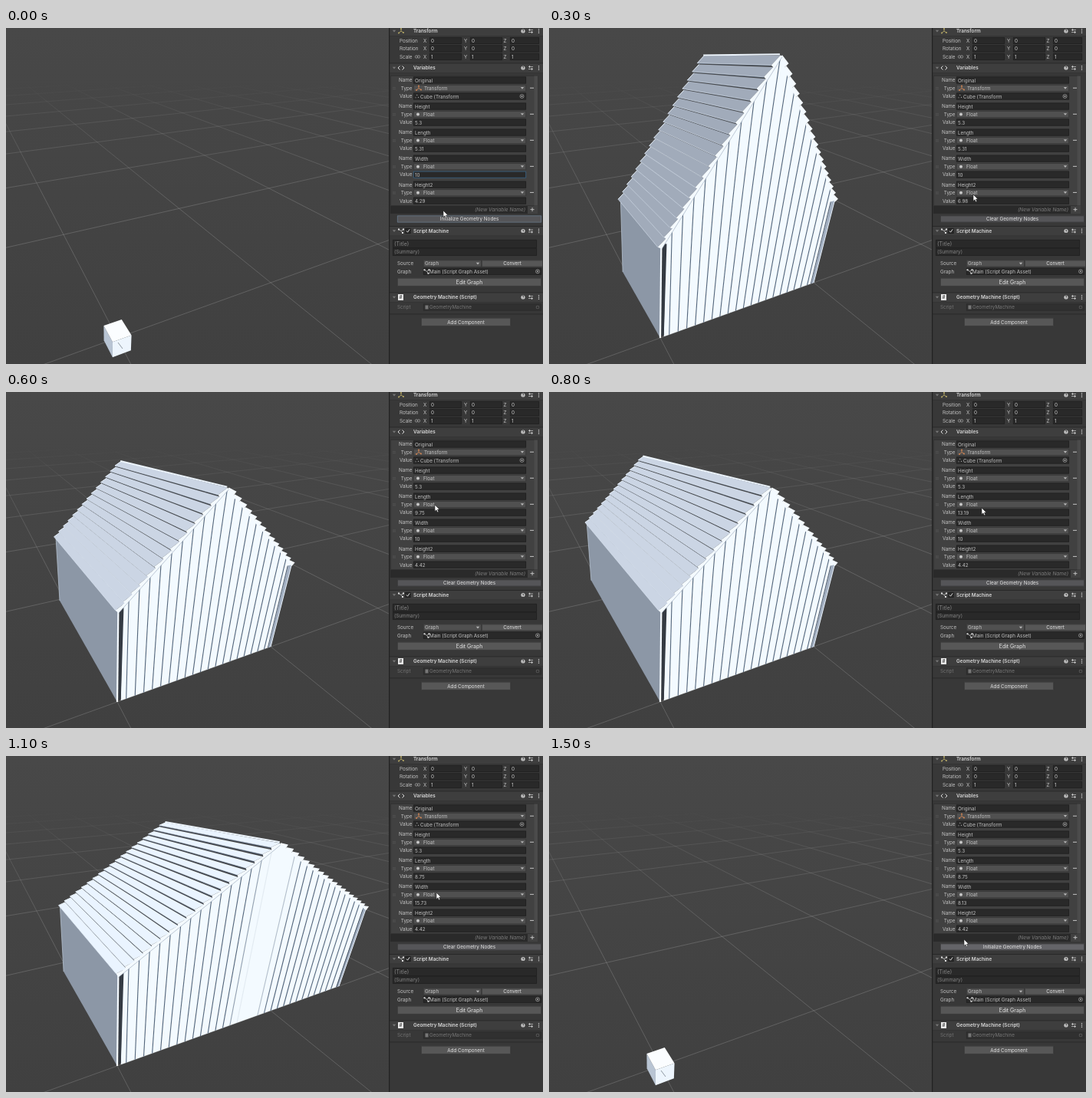
These frames come from a looping animation (700 px wide and 438 px high, 1600 ms). An HTML page with a canvas:

```html
<!DOCTYPE html>
<html lang="en">
<head>
<meta charset="utf-8">
<style>
html, body { margin: 0; width: 100%; height: 100%; overflow: hidden; background: #383838; }
canvas { display: block; width: 700px; height: 438px; }
</style>
</head>
<body>
<canvas id="stage" width="700" height="438"></canvas>
<script>
const ctx = document.getElementById('stage').getContext('2d');
const STEP = 100, SPLIT = 500, WALL = 5.3, PLANK = 0.5;

// One state per step: house shown, length, width, gable height, cursor x, cursor y
const STATES = [
  [0, 5.31, 10, 4.29, 570, 238],
  [1, 5.31, 10, 4.29, 566, 238],
  [1, 5.31, 10, 7.72, 556, 217],
  [1, 5.31, 10, 6.98, 553, 217],
  [1, 5.31, 10, 4.42, 549, 214],
  [1, 6.42, 10, 4.42, 554, 149],
  [1, 9.75, 10, 4.42, 559, 147],
  [1, 11.86, 10, 4.42, 562, 149],
  [1, 13.19, 10, 4.42, 564, 151],
  [1, 8.75, 10, 4.42, 558, 153],
  [1, 8.75, 12.4, 4.42, 556, 180],
  [1, 8.75, 15.73, 4.42, 561, 178],
  [1, 8.75, 8.13, 4.42, 550, 187],
  [1, 8.75, 8.13, 4.42, 548, 239],
  [0, 8.75, 8.13, 4.42, 544, 239],
  [0, 8.75, 8.13, 4.42, 541, 239]
];

// Perspective of the scene: w across the front, l into depth, h up
function project(w, l, h) {
  const d = 1 + 0.01828 * w + 0.058 * l - 0.026 * h;
  return [(145 + 26.31 * w - 3.63 * l - 3.55 * h) / d,
          (404 - 1.13 * w + 2.24 * l - 30.15 * h) / d];
}

function ground(w, l) {
  const d = 1 + 0.0217 * w + 0.05 * l;
  return [(145 + 27.5 * w - 3.25 * l) / d, 404 / d];
}

function trace(points) {
  ctx.beginPath();
  points.forEach(([x, y]) => ctx.lineTo(x, y));
}

function poly(points, fill) {
  trace(points);
  ctx.closePath();
  ctx.fillStyle = fill;
  ctx.fill();
}

function line(points, color, width = 1) {
  trace(points);
  ctx.strokeStyle = color;
  ctx.lineWidth = width;
  ctx.stroke();
}

const solid = (points, fill) => poly(points.map(p => project(...p)), fill);
const edge = (points, color, width) => line(points.map(p => project(...p)), color, width);

function drawGround() {
  const sky = ctx.createLinearGradient(0, 0, 0, 438);
  sky.addColorStop(0, '#484848');
  sky.addColorStop(1, '#404040');
  ctx.fillStyle = sky;
  ctx.fillRect(0, 0, SPLIT, 438);
  const fade = ctx.createLinearGradient(0, 72, 0, 230);
  fade.addColorStop(0, 'rgba(150,150,150,0)');
  fade.addColorStop(0.3, 'rgba(150,150,150,.24)');
  fade.addColorStop(1, 'rgba(150,150,150,.46)');
  for (let w = -10; w <= 300; w += 10) line([ground(w, -6), ground(w, 90)], fade, 0.8);
  for (let l = 0; l <= 90; l += 10) line([ground(-12, l), ground(300, l)], fade, 0.8);
}

function drawCube() {
  const a = -0.5, b = 0.5;
  solid([[a, a, a], [a, b, a], [a, b, b], [a, a, b]], '#b8c4d3');
  solid([[a, a, b], [a, b, b], [b, b, b], [b, a, b]], '#fbfdff');
  solid([[a, a, a], [b, a, a], [b, a, b], [a, a, b]], '#edf5fd');
  line([[146, 410], [152, 418]], '#77808b', 0.8);
}

function drawFront(W, rise) {
  const slope = rise / (W / 2);
  const top = w => WALL + slope * Math.min(w, W - w);
  solid([[0.2, 0, 0], [W, 0, 0], [W, 0, top(W)], [W / 2, 0, top(W / 2)], [0.2, 0, top(0.2)]], '#f3faff');
  for (let w = PLANK; w < W - 0.1; w += PLANK) {
    ctx.globalAlpha = W > 12 ? Math.min(1, Math.max(0, Math.abs(w - W * 0.515) - 0.5)) : 1;
    edge([[w, 0, 0], [w, 0, top(w)]], '#53657a', 1.1);
  }
  ctx.globalAlpha = 1;
  solid([[0.06, 0, 0.1], [0.2, 0, 0.1], [0.26, 0, 5.3], [0.06, 0, 5.3]], '#343a42');
  edge([[0, 0, 0], [0, 0, WALL]], '#f4faff', 2.2);
  solid([[W - 0.2, 0, 0], [W, 0, 0], [W + 0.02, 0, 5.2], [W - 0.24, 0, 5.2]], '#a3b0c2');
  edge([[W - 0.22, 0, 0], [W - 0.25, 0, 5.2]], '#46515f', 0.9);
  edge([[W, 0, 0], [W + 0.02, 0, 5.2]], '#e5eef8', 1);
}

function drawRoof(L, W, rise) {
  const half = W / 2, run = Math.hypot(half, rise);
  const nw = rise / run, nh = half / run, count = Math.ceil(run / PLANK);
  const g = Math.min(236, 160 + (nh - 0.58) * 252);
  const face = `rgb(${g},${g + 10},${Math.min(255, g + 25)})`;
  const near = -0.04, far = L - 0.35;
  const at = (s, lift, side) => {
    const w = -0.04 + s * (half + 0.04) - nw * lift;
    return [side ? W - w : w, WALL - 0.12 + s * (rise + 0.12) + nh * lift];
  };
  const set = ([w, h], l) => [w, l, h];
  for (const side of [1, 0]) {
    for (let i = 0; i < count; i++) {
      const s0 = i / count, s1 = (i + 1) / count;
      const low = at(s0, 0.18, side), high = at(s1, 0.05, side);
      const under = at(s0, 0.11, side), back = at(s1, -0.06, side);
      const foot = at(s0, -0.06, side);
      if (!side) {
        solid([set(under, near), set(under, far), set(low, far), set(low, near)], '#465263');
        solid([set(low, near), set(low, far), set(high, far), set(high, near)], face);
        edge([set(low, near), set(low, far)], '#e2ecf8', 0.6);
        edge([set(low, far), set(high, far)], '#e8f1fa', 1);
      }
      solid([low, high, back, foot].map(p => set(p, near)), '#f4faff');
      if (!side) edge([set(foot, near), set(back, near)], '#8795a8', 0.5);
    }
  }
  const ridge = at(1, 0.1, 0);
  edge([set(ridge, near), set(ridge, far)], '#edf5fd', 2);
}

function drawHouse(L, W, rise) {
  const back = L - 0.25;
  solid([[0, 0, 0], [0, L, 0], [0, back, 5.25], [0, 0, 5.25]], '#8c97a6');
  edge([[0, L, 0], [0, back, 5.25]], '#b4c0cf', 0.8);
  drawFront(W, rise);
  drawRoof(L, W, rise);
}

function box(x, y, w, h, fill, border) {
  ctx.fillStyle = fill;
  ctx.fillRect(x, y, w, h);
  if (!border) return;
  ctx.strokeStyle = border;
  ctx.lineWidth = 0.7;
  ctx.strokeRect(x + 0.35, y + 0.35, w - 0.7, h - 0.7);
}

function text(str, x, y, { color = '#c4c4c4', size = 6.3, weight = 400, align = 'left', style = '' } = {}) {
  ctx.font = `${style} ${weight} ${size}px Inter, sans-serif`;
  ctx.fillStyle = color;
  ctx.textAlign = align;
  ctx.fillText(str, x, y + 2.3);
}

function dot(x, y, r, color) {
  ctx.beginPath();
  ctx.arc(x, y, r, 0, Math.PI * 2);
  ctx.fillStyle = color;
  ctx.fill();
}

function ring(x, y, r) {
  ctx.beginPath();
  ctx.arc(x, y, r, 0, Math.PI * 2);
  ctx.strokeStyle = '#aaa';
  ctx.lineWidth = 0.7;
  ctx.stroke();
}

function picker(x, y) {
  ring(x, y, 2.5);
  dot(x, y, 1, '#aaa');
}

const field = (x, y, w, border = '#202020') => box(x, y - 4.5, w, 9, '#292929', border);
const button = (label, x, y, w, h, fill = '#575757', size = 6.3, border = '#303030') => {
  box(x, y - h / 2, w, h, fill, border);
  text(label, x + w / 2, y, { align: 'center', color: '#e4e4e4', size });
};
const arrow = (x, y, color = '#b5b5b5') => poly([[x - 2.2, y - 1.2], [x + 2.2, y - 1.2], [x, y + 1.5]], color);

function axes(x, y, color, k = 1) {
  const tips = [[0, -3], [-3, 2.5], [3, 2]].map(([dx, dy]) => [x + dx * k, y + dy * k]);
  tips.forEach(tip => {
    if (k === 1) line([[x, y], tip], color, 0.8);
    dot(...tip, 0.9 * k, color);
  });
}

function nodes(x, y) {
  line([[x - 3, y - 2], [x, y], [x + 3, y - 2]], '#ccc', 0.7);
  line([[x, y], [x + 2, y + 2.5]], '#ccc', 0.7);
  [[-3, -2], [3, -2], [2, 2.5]].forEach(([dx, dy]) => box(x + dx - 1, y + dy - 1, 2, 2, '#ddd'));
}

function header(title, y) {
  box(SPLIT, y - 6.5, 200, 13, '#3e3e3e');
  box(SPLIT, y - 6.5, 200, 0.8, '#242424');
  box(SPLIT, y + 6, 200, 0.6, '#303030');
  arrow(506, y, '#777');
  text(title, 531, y, { weight: 600, color: '#dadada', size: 6.35 });
  dot(674, y, 2.6, '#c8c8c8');
  text('?', 674, y - 0.2, { size: 4.8, weight: 700, color: '#3e3e3e', align: 'center' });
  [-1.5, 1.5].forEach(d => {
    line([[681, y + d], [687, y + d]], '#bbb', 0.8);
    box(684 + d - 0.6, y + d - 1.3, 1.2, 2.6, '#ccc');
  });
  [-2.3, 0, 2.3].forEach(d => dot(694.5, y + d, 0.75, '#ccc'));
}

function drawTransform() {
  header('Transform', 4);
  axes(515, 4, '#c2b36a');
  [['Position', 16.5, '0'], ['Rotation', 27, '0'], ['Scale', 37.5, '1']].forEach(([label, y, value]) => {
    text(label, 513, y);
    [['X', 544, 552], ['Y', 597, 605], ['Z', 648.5, 657]].forEach(([axis, lx, fx]) => {
      text(axis, lx, y);
      field(fx, y, fx === 657 ? 38 : 42);
      text(value, fx + 2, y);
    });
  });
  [535, 538].forEach(x => ring(x, 37.5, 1.7));
}

function drawVariables(L, W, rise, first) {
  header('Variables', 52);
  line([[513.5, 49.5], [511, 52], [513.5, 54.5]], '#ddd', 1);
  line([[516.5, 49.5], [519, 52], [516.5, 54.5]], '#ddd', 1);
  box(501, 62, 192, 170, '#414141', '#2b2b2b');
  box(688.5, 62.5, 4.5, 169, '#4b4b4b');
  const items = [['Original', 'Cube (Transform'], ['Height', WALL], ['Length', L], ['Width', W], ['Height2', rise]];
  items.forEach(([name, value], i) => {
    const y = 68 + i * 34.05, object = i === 0;
    ['Name', 'Type', 'Value'].forEach((label, k) => text(label, 529.5, y + k * 10.5, { align: 'right' }));
    field(531, y, 147);
    text(name, 533, y + 0.3);
    box(531, y + 6, 147, 9, '#505050', '#303030');
    text(object ? 'Transform' : 'Float', object ? 545 : 544, y + 10.3);
    if (object) axes(538, y + 10.5, '#d98a55');
    else dot(537, y + 10.5, 2, '#c8c8c8');
    arrow(673, y + 10.3);
    box(683, y + 9.7, 5, 1, '#c4c4c4');
    [-1, 1].forEach(d => box(504, y + 10.5 + d, 4, 0.6, '#5c5c5c'));
    field(531, y + 21, 147, first && i === 3 ? '#3f7099' : '#202020');
    if (object) axes(535.8, y + 21.2, '#bbb', 0.6);
    text(String(value), object ? 540 : 533, y + 21.2);
    if (object) picker(672.5, y + 21);
  });
  box(501, 232, 179, 10, '#2a2a2a');
  text('(New Variable Name)', 677, 236.5, { align: 'right', style: 'italic', color: '#7d7d7d', size: 6.5 });
  box(680, 232, 13, 10, '#414141');
  box(683.5, 236.2, 5, 0.9, '#c8c8c8');
  box(685.6, 234.1, 0.9, 5, '#c8c8c8');
}

function drawMachines() {
  header('Script Machine', 264.5);
  nodes(515, 264.5);
  box(520.5, 261, 7, 7, '#292929', '#1c1c1c');
  line([[522, 264.5], [523.5, 266.2], [526.2, 262.3]], '#ddd', 1);
  box(504, 276, 188, 11, '#292929', '#202020');
  box(504, 287, 188, 10, '#292929', '#202020');
  text('(Title)', 506, 281.5, { color: '#858585', size: 7 });
  text('(Summary)', 506, 292, { color: '#858585' });
  text('Source', 510, 307);
  box(544, 302.5, 76, 9, '#505050', '#303030');
  text('Graph', 546, 307);
  arrow(615, 307);
  button('Convert', 620, 307, 80, 9);
  text('Graph', 510, 317.3);
  field(544, 317.3, 154);
  nodes(548.5, 317.3);
  text('Main (Script Graph Asset)', 552, 317.5);
  picker(693, 317.3);
  button('Edit Graph', 510, 331.3, 188, 11, '#575757', 7);

  header('Geometry Machine (Script)', 351);
  box(511, 347, 7, 8, '#e8e8e8');
  text('#', 514.5, 351, { size: 5.5, weight: 700, color: '#4a4a4a', align: 'center' });
  text('Script', 510, 364, { color: '#737373' });
  box(544, 359.5, 154, 9, '#303030', '#2a2a2a');
  box(546.5, 361.5, 4, 5, '#777');
  text('GeometryMachine', 552, 364, { color: '#777' });
  dot(693, 364, 2.3, '#5c5c5c');
  dot(693, 364, 1.5, '#303030');
  box(SPLIT, 372.5, 200, 0.8, '#262626');
  button('Add Component', 541, 383.3, 117, 11);
}

function drawCursor(x, y) {
  const shape = [[0, 0], [0, 8.5], [2, 6.8], [3.4, 9.7], [4.8, 9], [3.5, 6.2], [6, 6]].map(([dx, dy]) => [x + dx, y + dy]);
  poly(shape, '#fff');
  line([...shape, shape[0]], '#222', 0.6);
}

function draw(index) {
  const [house, L, W, rise, cx, cy] = STATES[index];
  ctx.clearRect(0, 0, 700, 438);
  ctx.lineJoin = 'round';
  ctx.save();
  ctx.beginPath();
  ctx.rect(0, 0, SPLIT, 438);
  ctx.clip();
  drawGround();
  if (house) drawHouse(L, W, rise);
  else drawCube();
  ctx.restore();

  box(SPLIT, 0, 200, 438, '#383838');
  drawTransform();
  drawVariables(L, W, rise, index === 0);
  const hover = cy > 230, init = index === 0 || index > 12;
  button(init ? 'Initialize Geometry Nodes' : 'Clear Geometry Nodes', 510, 249, 188, 9,
    hover && index ? '#646468' : '#555558', 6.3, index ? '#303030' : '#66798c');
  drawMachines();
  box(SPLIT - 1, 0, 1.2, 438, '#222');
  drawCursor(cx, cy);
}

function tick(now) {
  draw(Math.floor(now / STEP) % STATES.length);
  requestAnimationFrame(tick);
}
draw(0);
requestAnimationFrame(tick);
</script>
</body>
</html>
```
